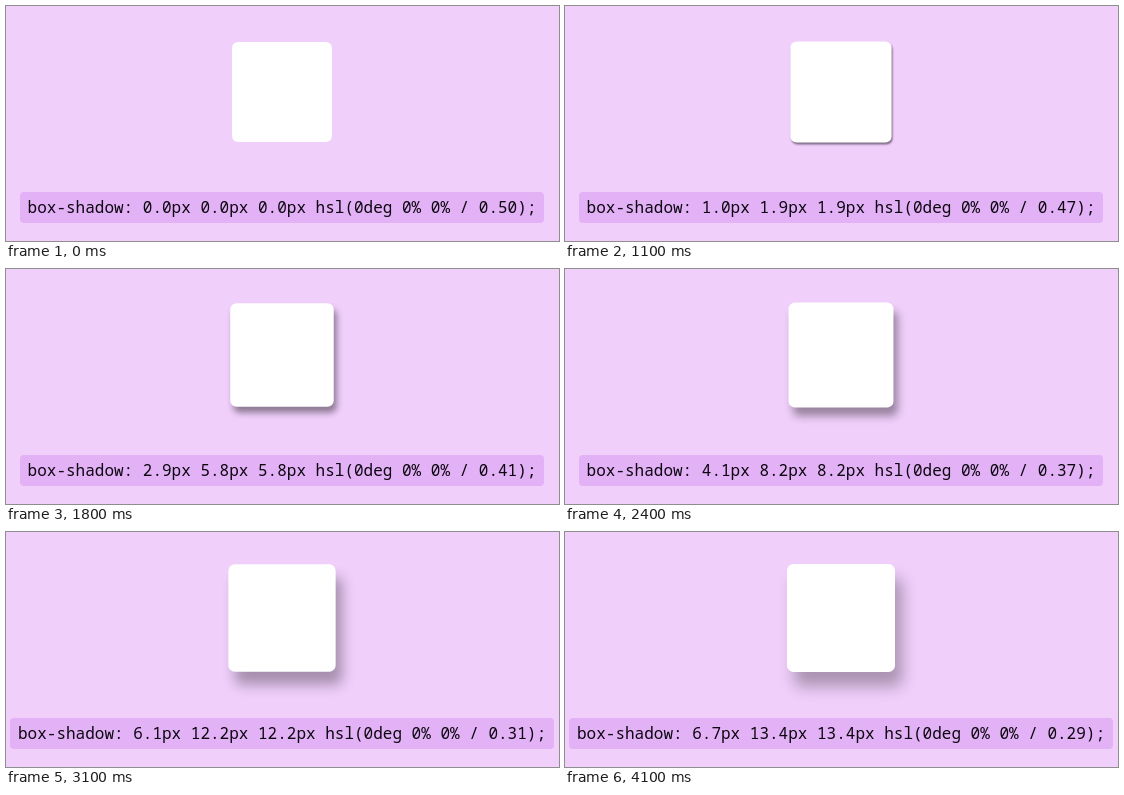
An HTML page that plays this animation: 553 by 235 pixels, repeating every 4.8 s.

```html
<!DOCTYPE html>
<html lang="en">
<head>
<meta charset="utf-8">
<title>Box shadow elevation</title>
<style>
  html, body { margin: 0; width: 100%; height: 100%; overflow: hidden; background: #f0cffb; }
  #card {
    position: absolute; left: 226px; top: 36px; width: 100px; height: 100px;
    border-radius: 6px; background: #fff;
  }
  #row { position: absolute; left: 0; top: 186px; width: 552px; display: flex; justify-content: center; }
  #code {
    box-sizing: border-box; height: 31px; padding: 0 8px; border-radius: 4px;
    background: #e3b1f5; color: #0c0610; white-space: pre;
    font: 16px/31px "Noto Sans Mono", "Liberation Mono", monospace;
  }
</style>
</head>
<body>
<div id="card"></div>
<div id="row"><div id="code"></div></div>
<script>
const LOOP = 4800, STEP = 100;
const card = document.getElementById('card');
const code = document.getElementById('code');

// [time in ms, vertical shadow offset in px]; linear in between
const lift = [
  [0, 0], [700, 0], [800, 0.2], [1400, 3.68], [1800, 5.8], [2400, 8.2],
  [3100, 12.2], [3200, 12.6], [3300, 12.8], [3500, 12.8], [3600, 13],
  [3900, 13], [4000, 13.2], [4100, 13.4], [LOOP, 13.4]
];

function offsetAt(time) {
  const i = lift.findIndex(([end]) => time < end);
  const [t0, y0] = lift[i - 1], [t1, y1] = lift[i];
  return y0 + (y1 - y0) * (time - t0) / (t1 - t0);
}

function draw() {
  const time = Math.floor(performance.now() % LOOP / STEP) * STEP;
  const y = offsetAt(time);
  const px = value => value.toFixed(1) + 'px';
  const alpha = (0.5 - y * 0.0157).toFixed(2);
  const shadow = `${px(y / 2)} ${px(y)} ${px(y)} hsl(0deg 0% 0% / ${alpha})`;
  card.style.boxShadow = shadow;
  card.style.transform = `scale(${1 + y * 0.006})`;
  code.textContent = `box-shadow: ${shadow};`;
  requestAnimationFrame(draw);
}
draw();
</script>
</body>
</html>
```
